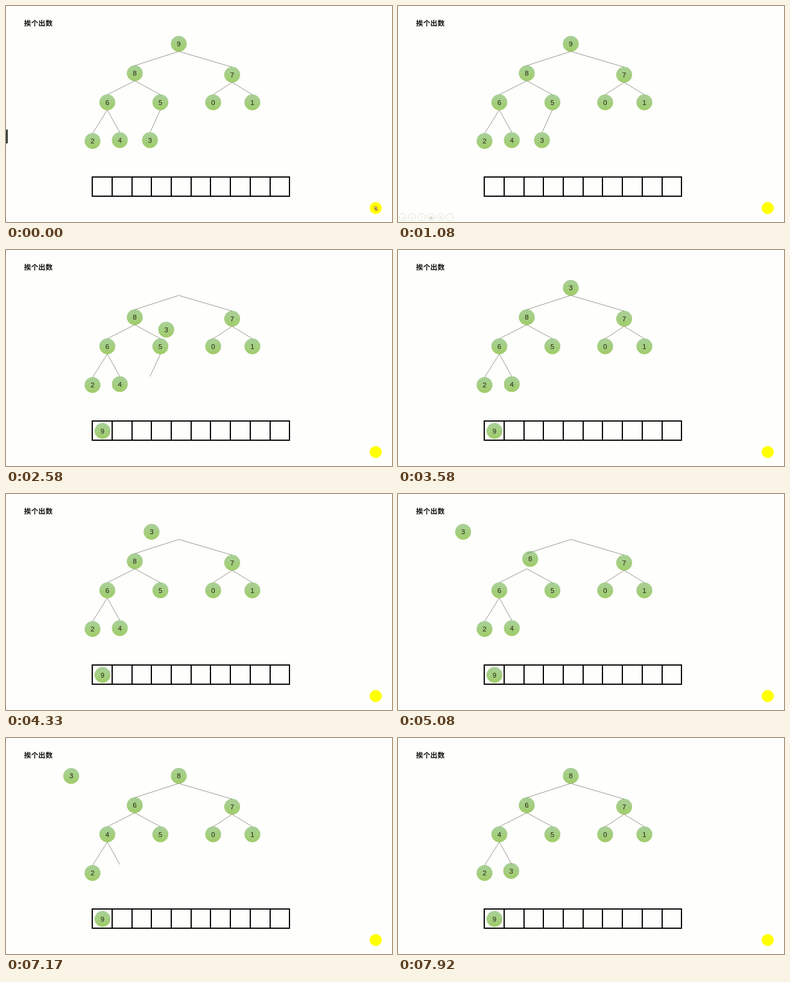
An HTML page for the animation above (8000 ms loop, 640 by 360 pixels).

```html
<!DOCTYPE html>
<html lang="zh">
<head>
<meta charset="utf-8">
<title>挨个出数</title>
<style>
  html, body { margin: 0; width: 100%; height: 100%; overflow: hidden; background: #fefefc; }
  svg { display: block; width: 100%; height: 100%; }
  .title { font: bold 11.8px "Noto Sans CJK SC", "Noto Sans CJK", sans-serif; fill: #141410; }
  .node text { font: 11.5px "Liberation Sans", Arial, sans-serif; text-anchor: middle; fill: #20240f; }
  .edges { stroke: #85877a; stroke-width: .85; }
  .array { fill: none; stroke: #050505; stroke-width: 2; }
  .tools circle { fill: none; stroke: #dfdfd2; stroke-width: .9; }
  .tools text { font: 7px "DejaVu Sans", sans-serif; text-anchor: middle; fill: #d2d2c4; }
</style>
</head>
<body>
<svg viewBox="0 0 640 360">
  <defs>
    <linearGradient id="green" x1="0" y1="0" x2="0" y2="1">
      <stop offset="0" stop-color="#a9d09a"/>
      <stop offset="1" stop-color="#a0cc68"/>
    </linearGradient>
  </defs>
  <text class="title" x="30" y="33">挨个出数</text>
  <rect id="stripe" y="206" width="3" height="23" fill="#3b423a"/>
  <path id="array" class="array"/>
  <g id="nodes"></g>
  <g id="edges" class="edges"></g>
  <g id="tools" class="tools"></g>
  <circle cx="613" cy="336.700" r="10" fill="#ff0"/>
  <g id="pointer" fill="#fff3c0" stroke="#8a4a12" stroke-width=".9">
    <circle cx="612.800" cy="336.500" r="2.300"/>
    <path d="M612 336.500l1 4.500 1.200-1.500 1.800 1.500-.8-3z"/>
  </g>
</svg>
<script>
const $ = id => document.getElementById(id);
const NS = 'http://www.w3.org/2000/svg';
const LOOP = 8000, FPS = 12, SHOT_FPS = 10;
const MOVE = .775; // seconds per move

function add(parent, tag, attrs, text) {
  const el = document.createElementNS(NS, tag);
  for (const key in attrs) el.setAttribute(key, attrs[key]);
  if (text !== undefined) el.textContent = text;
  return parent.appendChild(el);
}

// Heap slots in level order: the children of slot i are 2i + 1 and 2i + 2.
const slots = [
  [286.5, 63],
  [213.5, 112], [375, 114.5],
  [168, 160.5], [256, 160.5], [343.5, 160.5], [408.5, 160.5],
  [143.5, 225], [188.7, 223.5], [238.7, 223.5]
];
const heap = [9, 8, 7, 6, 5, 0, 1, 2, 4, 3];
const aside = [108, 63];
const firstCell = [160, 301.5];

const moves = [
  { v: 9, to: firstCell, at: 1.125 },
  { v: 3, to: slots[0], at: 2.18 },
  { v: 3, to: aside, at: 4.04 },
  { v: 8, to: slots[0], at: 4.96 },
  { v: 6, to: slots[1], at: 6.01 },
  { v: 4, to: slots[3], at: 6.38 },
  { v: 3, to: slots[8], at: 7.18 }
];

const nodes = heap.map(v => {
  const g = add($('nodes'), 'g', { class: 'node' });
  add(g, 'circle', { r: 13.2, fill: 'url(#green)' });
  add(g, 'text', { y: 4.2 }, v);
  return g;
});
$('nodes').append(nodes[0]); // the outgoing root passes over the others

const edges = slots.slice(1).map(([x2, y], i) => {
  const [x1, top] = slots[i >> 1];
  return add($('edges'), 'line', { x1, y1: top + 12.7, x2, y2: y - 12.7 });
});

let cells = 'M143 285H470M143 317H470';
for (let i = 0; i <= 10; i++) cells += `M${Math.round(143.2 + i * 32.7)} 284v34`;
$('array').setAttribute('d', cells);

[...'◁▷∕▣⚲⋯'].forEach((icon, i) => {
  const x = 8 + i * 15.6;
  add($('tools'), 'circle', { cx: x, cy: 352, r: 6 });
  add($('tools'), 'text', { x, y: 354.5 }, icon);
});

const clamp = x => Math.min(1, Math.max(0, x));
const ease = p => (1 - Math.cos(Math.PI * p)) / 2;
const show = (el, on) => el.setAttribute('visibility', on ? 'visible' : 'hidden');

function place(v, t) {
  return moves.filter(m => m.v === v).reduce((pos, { to, at }) => {
    const p = ease(clamp((t - at) / MOVE));
    return pos.map((a, i) => a + (to[i] - a) * p);
  }, slots[heap.indexOf(v)]);
}

function draw(t) {
  heap.forEach((v, i) => nodes[i].setAttribute('transform', `translate(${place(v, t)})`));
  show(edges[edges.length - 1], t < 3.15);
  show($('stripe'), t < .05);
  show($('pointer'), t < .15);
  $('tools').setAttribute('opacity', t < 2.05 ? clamp(t / .4) : 0);
}

function shotTime(ms) {
  const n = Math.floor(ms / 1000 * FPS + .05) % (LOOP / 1000 * FPS);
  return Math.ceil(n * SHOT_FPS / FPS - .5) / SHOT_FPS;
}

const start = performance.now();
function tick() {
  draw(shotTime((performance.now() - start) % LOOP));
  requestAnimationFrame(tick);
}
tick();
</script>
</body>
</html>
```
